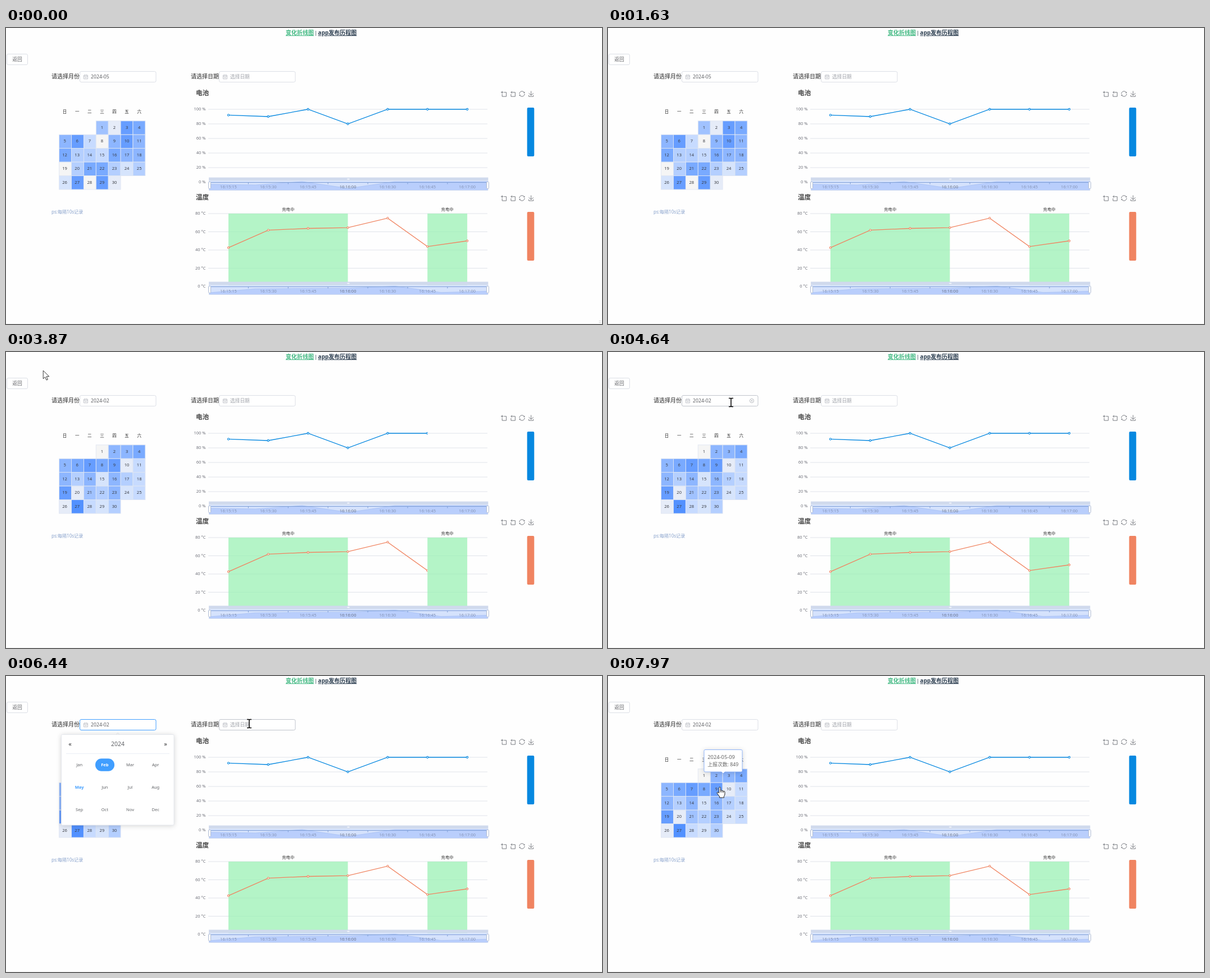
These frames come from a looping animation (1061 by 528 pixels, 8000 ms). An HTML page:

```html
<!DOCTYPE html>
<html lang="zh-CN">
<head>
<meta charset="utf-8">
<title>变化折线图</title>
<style>
html, body { margin: 0; width: 100%; height: 100%; overflow: hidden; background: #fefefe; }
svg { display: block; width: 1061px; height: 528px;
  font-family: "Noto Sans", "Noto Sans CJK SC", "Noto Sans CJK", sans-serif; }
#panel rect.box, #tip .box { filter: drop-shadow(0 1px 4px rgba(0,0,0,.16)); }
</style>
</head>
<body>
<svg id="stage" viewBox="0 0 1061 528"></svg>
<script>
const BLUE = '#0688e0', ORANGE = '#f08461', FOCUS = '#409eff', BORDER = '#dcdfe6';

const text = (x, y, s, size, fill, more = '') =>
  `<text x="${x}" y="${y}" font-size="${size}" fill="${fill}" ${more}>${s}</text>`;
const rect = (x, y, w, h, fill, more = '') =>
  `<rect x="${x}" y="${y}" width="${w}" height="${h}" fill="${fill}" ${more}/>`;
const line = (x1, y1, x2, y2, stroke, more = '') =>
  `<path d="M${x1} ${y1}L${x2} ${y2}" stroke="${stroke}" ${more}/>`;
const mid = 'text-anchor="middle"', end = 'text-anchor="end"', bold = 'font-weight="700"';
const range = n => [...Array(n).keys()];

function field(id, x, label, value, color) {
  return text(x - 50, 90, label, 10, '#222') +
    rect(x + .5, 77.5, 135.5, 19, '#fff', `id="${id}" rx="2.5" stroke="${BORDER}"`) +
    `<path d="M${x + 7.5} 84.2h7v6.6h-7zM${x + 7.5} 86.4h7M${x + 9.5} 83v2M${x + 12.5} 83v2M${x + 9} 88.6h4"
      fill="none" stroke="#b4b7be" stroke-width=".8"/>` +
    text(x + 20, 90, value, value ? 8.7 : 8.55, color, `id="${id}Text"`);
}

// Day colours run from grey through pale blue to full blue.
function shade(level) {
  const stops = [[245, 245, 245], [199, 219, 255], [82, 145, 255]];
  const i = level < 3 ? 0 : 1, p = i ? (level - 3) / 6 : level / 3;
  return `rgb(${stops[i].map((a, k) => Math.round(a + (stops[i + 1][k] - a) * p))})`;
}

function calendar(id, levels) {
  const cells = [...levels].map((level, i) => {
    const col = (i + 3) % 7, row = Math.floor((i + 3) / 7);
    return rect(94.6 + 21.9 * col, 165.8 + 24.45 * row, 21.9, 24.45, shade(+level),
        'stroke="#dfe6f2" stroke-width=".9"') +
      text(104.6 + 22.1 * col, 179.6 + 24.6 * row, i + 1, 7.6, '#3a3d44', mid);
  });
  return `<g id="${id}">${cells.join('')}</g>`;
}

const tools = [
  'M0,13.5h26.9M13.5,26.9V0M32.1,13.5H58V58H13.5V32.1',
  'M22,1.4L9.9,13.5l12.3,12.3M10.3,13.5H54.9v44.6H10.3v-26',
  'M47,18.9h9.8V8.7M56.3,20.1C52.1,9,40.5,.6,26.8,2.1C12.6,3.7,1.6,16.2,2.1,30.6M13,41.1H3.1v10.2M3.7,39.9c4.2,11.1,15.8,19.5,29.5,18c14.2-1.6,25.2-14.1,24.7-28.5',
  'M4.7,22.9L29.3,45.5L54.7,23.4M4.6,43.6V58H53.8V43.6M29.2,45.1V0'
];
const times = ['16:15:15', '16:15:30', '16:15:45', '16:16:00', '16:16:30', '16:16:45', '16:17:00'];

function chart({ top, title, max, unit, data, color, peak, gain, bands }) {
  const base = top + 130, px = i => 396 + 70.85 * i, py = v => base - v / max * 130;
  const rows = max / 20, crest = Math.max(...data);
  let s = text(338, top - 25, title, 11.6, '#464646', bold);
  for (let k = 0; k <= rows; k++) {
    const y = py(20 * k);
    if (k) s += line(360, y, 857, y, '#e0e3ea');
    s += text(355.5, y + 2.4, `${20 * k} ${unit}`, 7.5, '#6e7079', end);
  }
  for (const [a, b] of bands) {
    s += rect(px(a), top, px(b) - px(a), 130, 'rgba(155,240,180,.75)') +
      text((px(a) + px(b)) / 2, top - 5, '充电中', 7.4, '#333', mid);
  }
  // Zoom slider
  const shadow = data.map((v, i) => `${361.5 + 82.7 * i} ${peak + (crest - v) * gain}`).join('L');
  s += rect(361.5, base - 8, 496.5, 5.5, '#d0daed') +
    rect(361.5, base - 2.5, 496.5, 17, '#d5e2fc') +
    `<path d="M${shadow}V${base + 14.5}H361.5Z" fill="#b9cefc"/>` +
    `<path d="M${shadow}" fill="none" stroke="#a8c1f4" stroke-width=".8"/>` +
    rect(361.5, base - 8, 496.5, 22.5, 'none', 'stroke="#cdd7ea" stroke-width=".7"') +
    rect(607.5, base - 6.2, 4, 1.4, '#fff') +
    line(361, base + .5, 857, base + .5, '#7f9fd6');
  for (let k = 0; k < 8; k++) s += line(360.5 + 70.9 * k, base, 360.5 + 70.9 * k, base + 3.5, '#7f9fd6');
  times.forEach((v, i) => {
    s += text(px(i), base + 10.7, v, 7.5, i == 3 ? '#68728a' : '#8493b6', mid);
  });
  for (const x of [360.5, 855.5])
    s += rect(x, base - .5, 4, 12, '#fff', 'rx="1" stroke="#a9b6d0" stroke-width=".9"');

  tools.forEach((d, i) => {
    s += `<path d="${d}" transform="translate(${881 + 16.3 * i} ${top - 32.5}) scale(.166)"
      fill="none" stroke="#6a6d74" stroke-width="5.4"/>`;
  });
  s += rect(927.7, top - 3, 12.6, 87, color, 'rx="2"');
  const pts = data.map((v, i) => [px(i), py(v)]);
  s += `<g clip-path="url(#reveal)"><path d="M${pts.map(p => p.join(' ')).join('L')}"
      fill="none" stroke="${color}" stroke-width="1.3"/>` +
    pts.map(([x, y]) => `<circle cx="${x}" cy="${y}" r="1.6" fill="#fff" stroke="${color}" stroke-width="1.1"/>`).join('') +
    '</g>';
  return s;
}

function monthPanel() {
  const names = 'Jan Feb Mar Apr May Jun Jul Aug Sep Oct Nov Dec'.split(' ');
  return `<g id="panel"><path d="M195.5 105L199 101.5L202.5 105" fill="#fff" stroke="#e4e7ed"/>` +
    rect(98.5, 104.5, 200.5, 161.5, '#fff', 'class="box" rx="2" stroke="#e4e7ed"') +
    text(114, 125, '«', 11, '#303133', mid) + text(284, 125, '»', 11, '#303133', mid) +
    text(199, 125, '2024', 10.4, '#606266', mid) +
    line(107, 138.5, 291, 138.5, '#ebeef5') +
    rect(159, 147.3, 34, 22.4, FOCUS, 'rx="11"') +
    names.map((n, i) => text(130.6 + 45.2 * (i % 4), 161.2 + 39.8 * Math.floor(i / 4), n, 7.5,
      i == 1 ? '#fff' : i == 4 ? FOCUS : '#606266', mid + (i == 1 || i == 4 ? ' ' + bold : ''))).join('') +
    '</g>';
}

const tooltip = `<g id="tip"><path class="box" d="M173 131.5H237Q239 131.5 239 133.5V169Q239 171 237 171H208L205 174L202 171H173Q171 171 171 169V133.5Q171 131.5 173 131.5Z"
    fill="#fff" stroke="#85adfa" stroke-width=".9"/>` +
  text(177.3, 148, '2024-05-09', 9.3, '#666') + text(177.3, 161, '上报次数: 849', 8.8, '#666') + '</g>';

const pointers = `<g id="pointer"><circle id="halo" r="11.3" fill="#fbf86a" opacity=".92"/>
  <path id="arrow" d="M0 0V14.6L3.4 11.5L5.8 17L8.2 16L5.8 10.6H10.6Z" fill="#fff" stroke="#222" stroke-width=".9"/>
  <path id="beam" d="M-4 -7.5H-1Q0 -7.5 0 -6Q0 -7.5 1 -7.5H4M0 -6.5V6.5M-4 7.5H-1Q0 7.5 0 6Q0 7.5 1 7.5H4" fill="none" stroke="#000" stroke-width="1.5"/>
  <path id="hand" d="M-1.4 1Q0 -1.2 1.4 1V6Q3 5 4 6.7Q5.5 5.8 6.5 7.4Q8.7 6.8 9 9V13Q8.6 15.5 7.4 16.5V19H-.4V17Q-3 14 -4.8 10.8Q-5 8.6 -2.8 9.4L-1.4 11ZM1.4 6V9.5M4 7V9.8M6.5 7.6V10"
    fill="#fff" stroke="#222" stroke-width="1"/></g>`;

const stage = document.getElementById('stage');
stage.innerHTML =
  '<clipPath id="reveal"><rect id="mask" x="360" y="130" height="340"/></clipPath>' +
  text(498, 12.2, '变化折线图', 10, '#42b983', bold + ' text-decoration="underline"') +
  text(551.7, 12, '|', 9, '#2c3e50', mid) +
  text(555.6, 12.2, 'app发布历程图', 10, '#2c3e50', bold + ' text-decoration="underline"') +
  rect(1.5, 46.5, 37, 19, '#fff', `id="back" rx="2.5" stroke="${BORDER}"`) +
  text(20, 59.3, '返回', 8.8, '#606266', `id="backText" ${mid}`) +
  field('month', 131, '请选择月份', '2024-05', '#606266') +
  field('date', 379, '请选择日期', '选择日期', '#a0a3aa') +
  '<g id="clear" fill="none" stroke="#a8abb2" stroke-width=".8"><circle cx="256" cy="87" r="3.6"/><path d="M254.6 85.6l2.8 2.8M257.4 85.6l-2.8 2.8"/></g>' +
  line(183.5, 82, 183.5, 92, '#333', 'id="caret" stroke-width=".9"') +
  [...'日一二三四五六'].map((d, i) => text(104.6 + 22.1 * i, 152, d, 7.5, '#222', mid)).join('') +
  calendar('may', '518768306867443766047742428081') +
  calendar('feb', '066767878136462643815462319324') +
  text(81, 331, 'ps:每隔10s记录', 8.05, '#86a0cb') +
  chart({ top: 145, title: '电池', max: 100, unit: '%', data: [92, 90, 100, 80, 100, 100, 100],
    color: BLUE, peak: 274, gain: .6, bands: [] }) +
  chart({ top: 331, title: '温度', max: 80, unit: '°C', data: [42.5, 61.8, 63.7, 64.6, 75, 43.8, 50],
    color: ORANGE, peak: 460.5, gain: .36, bands: [[0, 3], [5, 6]] }) +
  line(0, 527.5, 1061, 527.5, '#f3f3f3') +
  '<path id="corner" d="M1055.5 522.5h4M1055.5 525.5h4" stroke="#d4d4d4"/>' +
  monthPanel() + tooltip + pointers;

const $ = id => document.getElementById(id);
const show = (id, on) => $(id).setAttribute('visibility', on ? 'visible' : 'hidden');
const set = (id, key, value) => $(id).setAttribute(key, value);
const within = (t, a, b) => t >= a && t < b;
const progress = (t, start, length) => Math.min(1, Math.max(0, (t - start) / length));
const easeOut = p => 1 - (1 - p) ** 4;

const path = [
  [720, 918, 449], [1000, 650, 345], [1330, 110, 95], [1410, 22, 60], [1490, 31, 1], [1560, 31, 0],
  [3650, 33, 0], [3870, 66, 33], [4600, 219, 90], [5230, 219, 90], [5550, 339, 84],
  [5700, 385, 82], [6040, 433, 85], [6780, 433, 85], [6950, 303.5, 40.5], [7200, 303.5, 40.5],
  [7550, 238, 122], [7700, 212, 180], [7830, 199, 198], [8000, 199, 198]
];
function pointerAt(t) {
  const i = path.findIndex(p => p[0] > t);
  if (i < 1) return path[0].slice(1);
  const [t0, x0, y0] = path[i - 1], [t1, x1, y1] = path[i], p = (t - t0) / (t1 - t0);
  return [x0 + (x1 - x0) * p, y0 + (y1 - y0) * p];
}

function draw(t) {
  const reloaded = t >= 3090;
  show('corner', t < 70);
  show('may', !reloaded);
  show('feb', reloaded);
  $('monthText').textContent = reloaded ? '2024-02' : '2024-05';
  set('mask', 'width', reloaded ? 500 * progress(t, 3090, 1000) : 500);

  const [x, y] = pointerAt(t);
  const visible = within(t, 720, 1630) || t >= 3650;
  const over = (x0, y0, x1, y1) => visible && x >= x0 && x < x1 && y >= y0 && y < y1;
  const onMonth = over(131, 77, 267, 97), onDate = over(379, 77, 515, 97);
  const onBack = over(1, 46, 39, 66), onLabel = over(329, 77, 379, 97);
  const onDays = reloaded && over(95, 166, 248, 288);
  const kind = onMonth || onDate || onLabel ? 'beam' : onDays || onBack ? 'hand' : 'arrow';

  set('pointer', 'transform', `translate(${x} ${y})`);
  for (const k of ['arrow', 'beam', 'hand']) show(k, visible && k == kind);
  show('halo', within(t, 4800, 5060) || within(t, 6950, 7150));

  set('back', 'fill', onBack ? '#ecf5ff' : '#fff');
  set('back', 'stroke', onBack ? '#c6e2ff' : BORDER);
  set('backText', 'fill', onBack ? FOCUS : '#606266');

  const focused = within(t, 4910, 7250);
  set('month', 'stroke', focused ? FOCUS : onMonth ? '#c0c4cc' : BORDER);
  set('date', 'stroke', onDate ? '#c0c4cc' : BORDER);
  show('clear', onMonth);
  show('caret', within(t, 4910, 6970) && (t - 4910) % 1000 < 500);

  const open = easeOut(progress(t, 4900, 300)) - easeOut(progress(t, 6976, 300));
  show('panel', open > .001);
  set('panel', 'opacity', open);
  set('panel', 'transform', `translate(0 ${105 * (1 - open)}) scale(1 ${open})`);

  const slide = easeOut(progress(t, 7660, 280));
  show('tip', slide > 0);
  set('tip', 'opacity', slide);
  set('tip', 'transform', `translate(${12 * (1 - slide)} ${-12 * (1 - slide)})`);
}

const start = performance.now();
function tick() {
  draw((performance.now() - start) % 8000);
  requestAnimationFrame(tick);
}
tick();
</script>
</body>
</html>
```
